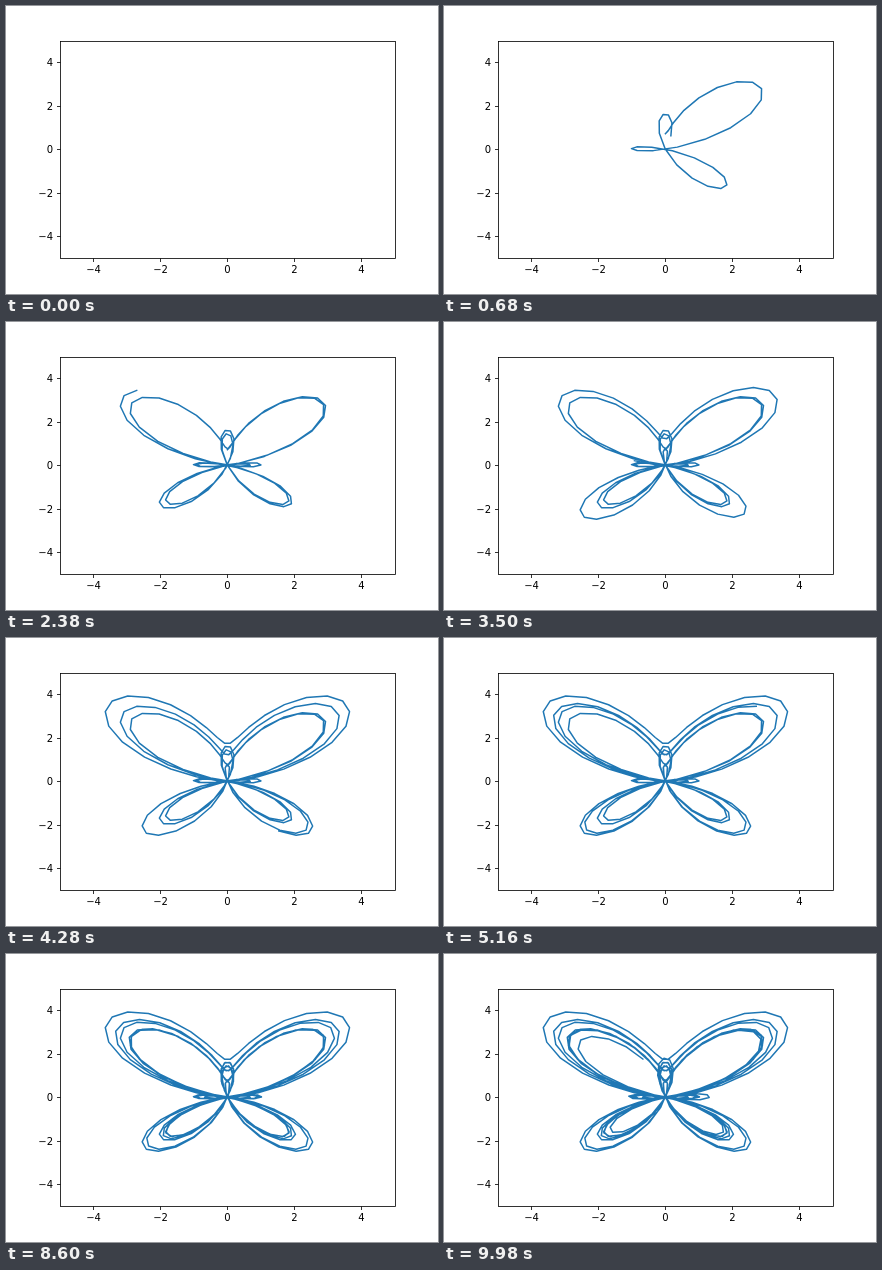
An HTML page for the animation above (10000 ms loop, 432 by 288 pixels).

```html
<!DOCTYPE html>
<html lang="en">
<head>
<meta charset="utf-8">
<title>Butterfly curve</title>
<style>
  html, body { margin: 0; width: 100%; height: 100%; overflow: hidden; background: #fff; }
  svg { display: block; }
  text { font: 10px "DejaVu Sans", sans-serif; }
</style>
</head>
<body>
<svg width="432" height="288" viewBox="0 0 432 288">
  <polyline id="curve" fill="none" stroke="#1f77b4" stroke-width="1.5" stroke-linejoin="round" stroke-linecap="square"/>
  <g id="axes" fill="none" stroke="#000" stroke-width="0.8">
    <rect x="54.5" y="35.5" width="335" height="217"/>
  </g>
  <g id="labels"></g>
</svg>
<script>
const STEP_MS = 20, STEPS = 500, DT = 0.1;
const curve = document.getElementById('curve');
const axes = document.getElementById('axes');
const labels = document.getElementById('labels');

const px = x => 221.4 + 33.48 * x;
const py = y => 143.28 - 21.744 * y;
const snap = v => Math.round(v) + 0.5;

function add(parent, tag, attrs, text = '') {
  const el = document.createElementNS('http://www.w3.org/2000/svg', tag);
  for (const key in attrs) el.setAttribute(key, attrs[key]);
  el.textContent = text;
  parent.append(el);
}

for (const v of [-4, -2, 0, 2, 4]) {
  const x = snap(px(v)), y = snap(py(v));
  const label = String(v).replace('-', '\u2212');
  add(axes, 'path', { d: `M${x} 252.5v3.5M54.5 ${y}h-3.5` });
  add(labels, 'text', { x, y: 267, 'text-anchor': 'middle' }, label);
  add(labels, 'text', { x: 47, y: y + 3.5, 'text-anchor': 'end' }, label);
}

const points = Array.from({ length: STEPS }, (_, i) => {
  const t = i * DT;
  const r = Math.exp(Math.cos(t)) - 2 * Math.cos(4 * t) + Math.sin(t / 12) ** 5;
  return `${px(r * Math.sin(t)).toFixed(3)},${py(r * Math.cos(t)).toFixed(3)}`;
});

const start = performance.now();
function draw() {
  const step = Math.floor((performance.now() - start) / STEP_MS) % STEPS;
  curve.setAttribute('points', step ? points.slice(0, step + 1).join(' ') : '');
  requestAnimationFrame(draw);
}
draw();
</script>
</body>
</html>
```
